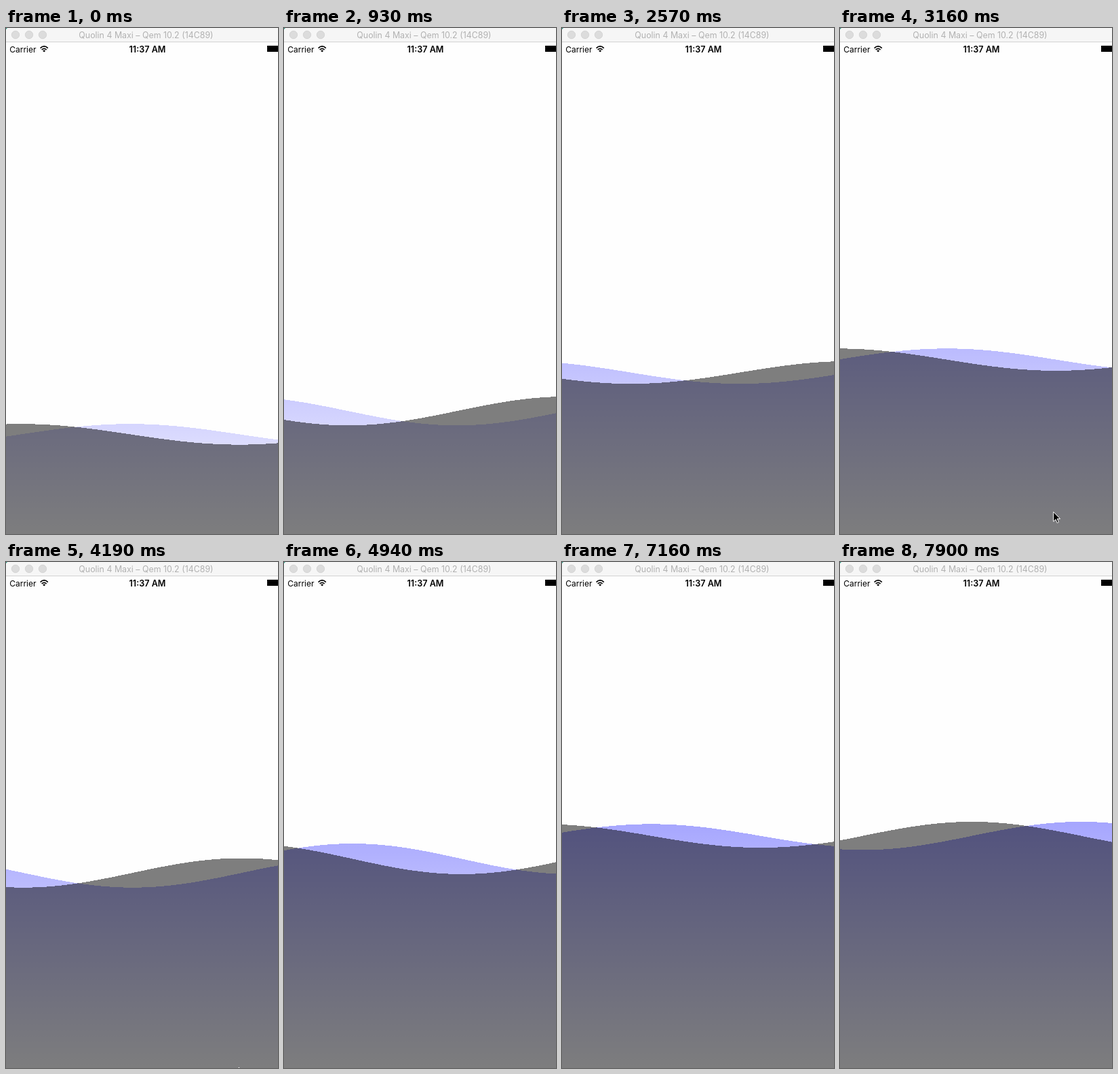
An HTML page that plays this animation: 401x744 px, repeating every 8000 ms.

```html
<!DOCTYPE html>
<html lang="en">
<head>
<meta charset="utf-8">
<title>Rising waves</title>
<style>
  html, body { margin: 0; width: 100%; height: 100%; overflow: hidden; background: #fefefe; }
  svg { display: block; width: 401px; height: 744px; }
  text { font-family: Inter, "Open Sans", sans-serif; }
</style>
</head>
<body>
<svg viewBox="0 0 401 744">
  <defs>
    <linearGradient id="tint" gradientUnits="userSpaceOnUse" x1="0" y1="370" x2="0" y2="744">
      <stop offset="0" stop-color="#00f" stop-opacity=".36"/>
      <stop offset="1" stop-color="#00f" stop-opacity=".01"/>
    </linearGradient>
  </defs>
  <rect width="401" height="744" fill="#fefefe"/>

  <g shape-rendering="crispEdges">
    <path id="blue" fill="url(#tint)"/>
    <path id="gray" fill="#000" fill-opacity=".5"/>
  </g>

  <!-- window title bar -->
  <rect width="401" height="20" fill="#f6f6f6"/>
  <rect y="20" width="401" height="1" fill="#d2d2d2"/>
  <path d="M0 0H2L0 2Z" fill="#1f9a80"/>
  <g fill="#dcdcdc" stroke="#d0d0d0" stroke-width=".8">
    <circle cx="14" cy="10" r="5.7"/><circle cx="34" cy="10" r="5.7"/><circle cx="54" cy="10" r="5.7"/>
  </g>
  <text x="206.5" y="15" font-size="12.4" text-anchor="middle" fill="#b1b1b1">Quolin 4 Maxi – Qem 10.2 (14C89)</text>

  <!-- status bar -->
  <text x="5.2" y="36" font-size="12">Carrier</text>
  <g fill="none" stroke="#000" stroke-width="1.7">
    <path d="M50.6 29.6Q56.2 24.2 61.8 29.6"/>
    <path d="M52.7 32Q56.2 28.7 59.7 32"/>
  </g>
  <path d="M54.2 33.4Q56.2 31.8 58.2 33.4L56.2 35.5Z"/>
  <text x="208.5" y="36" font-size="12.6" font-weight="600" text-anchor="middle">11:37 AM</text>
  <rect x="385" y="26" width="16" height="9"/>

  <path id="cursor" d="M.7 1.5V15.6L4 12.6L6.2 17.6L8.4 16.6L6.2 11.7H10.6Z"
        fill="#000" stroke="#fff" stroke-width="1"/>
</svg>
<script>
const LOOP = 8000, WIDTH = 401, HEIGHT = 744, WAVELENGTH = 644;

// [first time, last time, number of steps]
const RUNS = [[0, 0, 1], [180, 1080, 7], [1230, 2270, 8], [2420, 3460, 8],
  [3600, 4640, 8], [4790, 5830, 8], [5980, 7020, 8], [7160, 7900, 6]];
const TICKS = RUNS.flatMap(([from, to, count]) => Array.from({ length: count },
  (_, i) => Math.floor((from + (to - from) * i / Math.max(1, count - 1)) / 10) * 10));

// time -> horizontal travel of the waves
const TRAVEL = [[0, 0], [1820, 762.5], [3160, 1262.5], [4190, 1613.5],
  [5680, 2083], [7160, 2524.5], [7900, 2748.5]];

// time -> pointer tip
const POINTER = [[3010, 314, 710], [3310, 314, 710], [3460, 316, 715],
  [3600, 320, 720], [4190, 342.5, 741.5], [4340, 350, 748]];

const byId = id => document.getElementById(id);
const segment = (table, t) => {
  let i = 0;
  while (i < table.length - 2 && t >= table[i + 1][0]) i++;
  return i;
};

function slope(i) {
  const a = TRAVEL[Math.max(0, i - 1)], b = TRAVEL[Math.min(TRAVEL.length - 1, i + 1)];
  return (b[1] - a[1]) / (b[0] - a[0]);
}

function travelAt(t) {
  const i = segment(TRAVEL, t);
  const [t0, s0] = TRAVEL[i], [t1, s1] = TRAVEL[i + 1];
  const span = t1 - t0, u = (t - t0) / span, v = 1 - u;
  return s0 * (1 + 2 * u) * v * v + s1 * u * u * (3 - 2 * u)
    + span * u * v * (slope(i) * v - slope(i + 1) * u);
}

function wave(peak, level, amplitude) {
  let d = `M0 ${HEIGHT}`;
  for (let x = 0; x <= WIDTH + 3; x += 3) {
    const y = level - amplitude * Math.cos(2 * Math.PI * (x - peak) / WAVELENGTH);
    d += `L${x} ${y.toFixed(2)}`;
  }
  return d + `V${HEIGHT}Z`;
}

function drawPointer(t) {
  const visible = t >= POINTER[0][0] && t < POINTER.at(-1)[0];
  byId("cursor").style.display = visible ? "" : "none";
  if (!visible) return;
  const i = segment(POINTER, t), [t0, x0, y0] = POINTER[i], [t1, x1, y1] = POINTER[i + 1];
  const u = (t - t0) / (t1 - t0);
  byId("cursor").setAttribute("transform", `translate(${x0 + (x1 - x0) * u} ${y0 + (y1 - y0) * u})`);
}

function draw(t) {
  const travel = travelAt(t);
  const level = Math.max(402.7, 597.4 - travel / 11.5);
  // the swell grows and shrinks linearly
  const cycle = (travel + 28) / 1192 % 1;
  const amplitude = 14.8 + 9 * (1 - Math.abs(2 * cycle - 1));
  const peak = 22 + travel;
  byId("gray").setAttribute("d", wave(peak, level, amplitude));
  byId("blue").setAttribute("d", wave(peak + WAVELENGTH / 4, level, amplitude));
  drawPointer(t);
}

const start = performance.now();
function frame(now) {
  const t = Math.max(0, now - start) % LOOP;
  draw(TICKS.findLast(tick => tick <= t + 1));
  requestAnimationFrame(frame);
}
draw(0);
requestAnimationFrame(frame);
</script>
</body>
</html>
```
